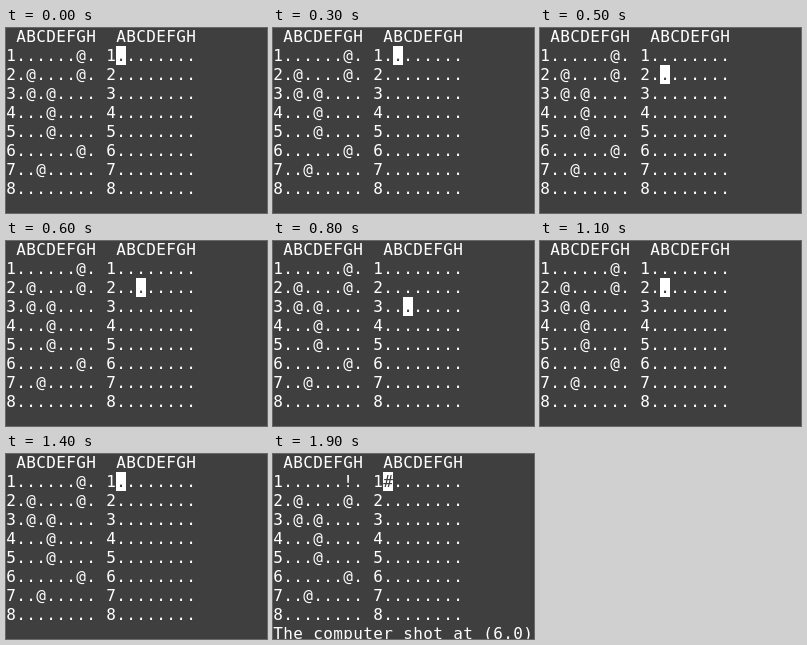
Recreate the animation shown at these times as an HTML page. Size 261 by 185 pixels, loop 8000 ms.

```html
<!DOCTYPE html>
<html lang="en">
<head>
<meta charset="utf-8">
<title>Battleship in a terminal</title>
<style>
  :root { --bg: #3f3f3f; --fg: #fff; --w: 10px; --h: 19px; }
  html, body { margin: 0; width: 100%; height: 100%; overflow: hidden; background: var(--bg); }
  #term {
    position: absolute; inset: 0; overflow: clip;
    background: var(--bg); color: var(--fg);
    font: 16px/var(--h) "DejaVu Sans Mono", monospace;
    font-variant-ligatures: none;
    white-space: pre;
  }
  /* Text on the character grid, each glyph centred in its cell. */
  .cell {
    --gap: calc(var(--w) - 1ch);
    position: absolute; box-sizing: border-box;
    left: calc(var(--col) * var(--w)); top: calc(var(--row) * var(--h) - 1px);
    min-height: var(--h);
    padding-left: calc(var(--gap) / 2);
    letter-spacing: var(--gap);
    background: var(--bg);
  }
  .box { width: var(--w); }
  .cursor {
    background: var(--fg); color: var(--bg);
    animation: walk 8s step-end infinite;
  }
  .before { position: absolute; animation: before 8s step-end infinite; }
  .after { animation: after 8s step-end infinite; }

  @keyframes walk {
    0%     { --col: 11; --row: 1; }
    3.75%  { --col: 12; --row: 1; }
    6.25%  { --col: 12; --row: 2; }
    7.5%   { --col: 13; --row: 2; }
    10%    { --col: 13; --row: 3; }
    12.5%  { --col: 12; --row: 3; }
    13.75% { --col: 12; --row: 2; }
    17.5%, 100% { --col: 11; --row: 1; }
  }
  @keyframes before { 0% { visibility: visible; } 23.75%, 100% { visibility: hidden; } }
  @keyframes after { 0% { visibility: hidden; } 23.75%, 100% { visibility: visible; } }
</style>
</head>
<body>
<div id="term"><div class="cell" style="--col:0;--row:0"> ABCDEFGH  ABCDEFGH
1......@. 1........
2.@....@. 2........
3.@.@.... 3........
4...@.... 4........
5...@.... 5........
6......@. 6........
7..@..... 7........
8........ 8........</div><div class="cell box after" style="--col:7;--row:1">!</div><div class="cell after" style="--col:0;--row:9">The computer shot at (6,0)</div><div class="cell box cursor" style="--col:11;--row:1"><span class="before">.</span><span class="after">#</span></div></div>
</body>
</html>
```
